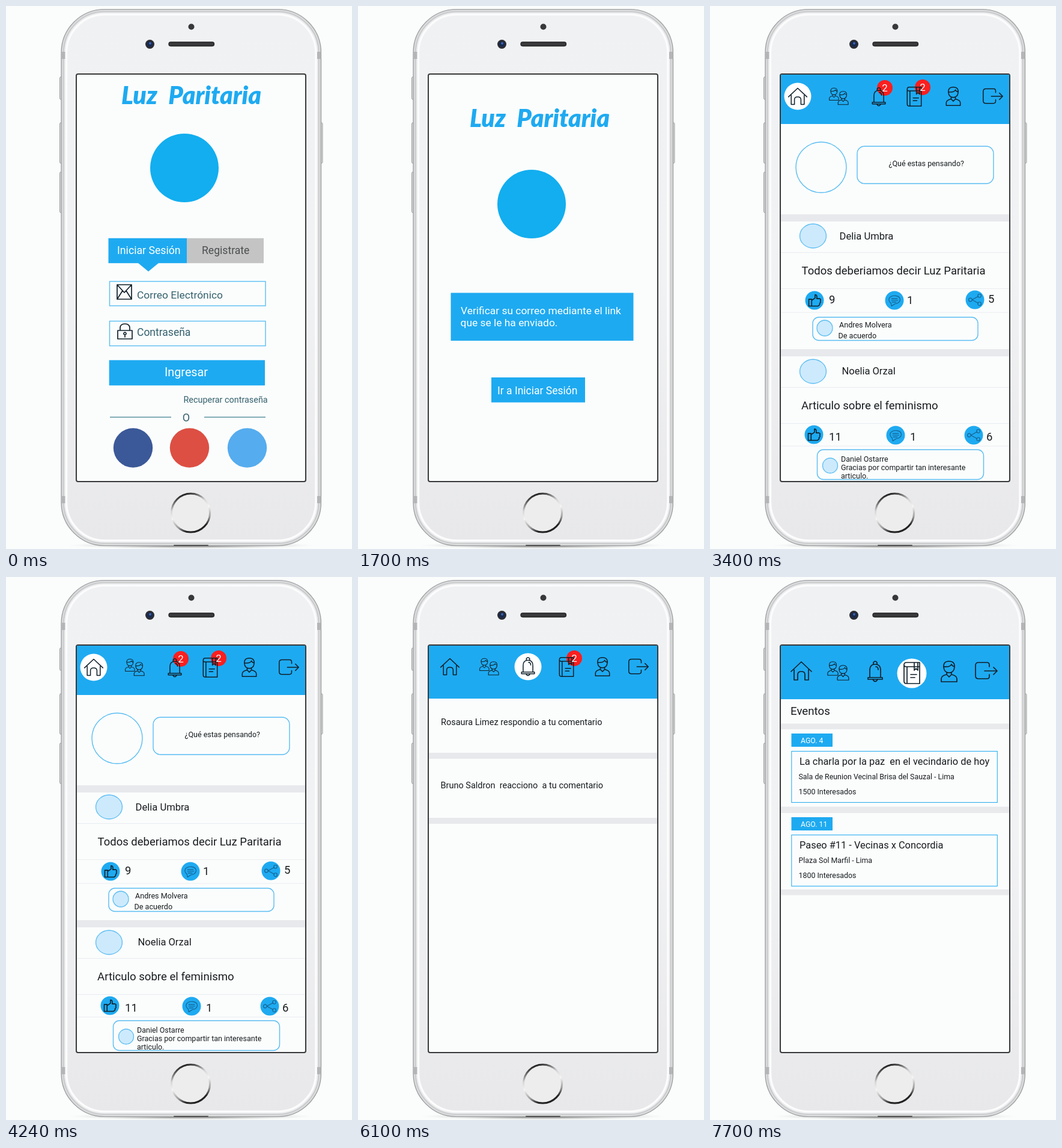
An HTML page that plays this animation: 576 px wide and 902 px high, repeating every 8000 ms.

```html
<!DOCTYPE html>
<html lang="es">
<head>
<meta charset="utf-8">
<style>
  html, body { margin: 0; width: 100%; height: 100%; overflow: hidden; background: #fafdfc; }
  svg { display: block; width: 576px; height: 902px; }
  text { font-family: Roboto, "Liberation Sans", sans-serif; white-space: pre; }
  .title { font: italic 900 41px Lato, "Open Sans", sans-serif; word-spacing: 10px; }
  .icon { fill: none; stroke: #10202a; stroke-width: 1.7; stroke-linecap: round; stroke-linejoin: round; }
</style>
</head>
<body>
<svg id="stage" viewBox="0 0 576 902">
  <defs>
    <linearGradient id="body" x2="0" y2="1">
      <stop stop-color="#f0f1f3"/><stop offset=".5" stop-color="#f1f2f3"/><stop offset="1" stop-color="#e8e8ea"/>
    </linearGradient>
    <linearGradient id="button" x2=".35" y2="1">
      <stop stop-color="#999"/><stop offset=".12" stop-color="#222"/><stop offset=".4" stop-color="#d5d5d5"/>
      <stop offset=".6" stop-color="#f5f5f5"/><stop offset=".85" stop-color="#999"/><stop offset="1" stop-color="#222"/>
    </linearGradient>
    <radialGradient id="shade">
      <stop stop-color="#555"/><stop offset=".3" stop-color="#999"/><stop offset="1" stop-color="#ddd" stop-opacity="0"/>
    </radialGradient>
  </defs>
  <g id="phone"></g>
  <g id="screens"></g>
</svg>
<script>
const BLUE = '#1eaaf1', SKY = '#5bbdf2', TEAL = '#35616d', INK = '#181c1e', PALE = '#fbfdfd';
const APP = 'Luz Paritaria';

const rect = (x, y, w, h, fill, extra = '') =>
  `<rect x="${x}" y="${y}" width="${w}" height="${h}" fill="${fill}" ${extra}/>`;
const frame = (x, y, w, h, stroke = SKY, r = 0, width = 1.4) =>
  rect(x, y, w, h, PALE, `stroke="${stroke}" stroke-width="${width}" rx="${r}"`);
const disc = (x, y, r, fill, extra = '') => `<circle cx="${x}" cy="${y}" r="${r}" fill="${fill}" ${extra}/>`;
const path = (d, fill = 'none', extra = '') => `<path d="${d}" fill="${fill}" ${extra}/>`;
const line = (x1, y1, x2, y2, stroke, width = 1) =>
  path(`M${x1} ${y1}L${x2} ${y2}`, 'none', `stroke="${stroke}" stroke-width="${width}"`);
const text = (x, y, size, str, fill = INK, extra = '') =>
  `<text x="${x}" y="${y}" font-size="${size}" fill="${fill}" ${extra}>${str}</text>`;
const centered = (x, y, size, str, fill) => text(x, y, size, str, fill, 'text-anchor="middle"');

const icons = {
  home: 'M-17 1L0-15L17 1M-12-2V15H-6V6Q-6 1 0 1Q6 1 6 6V15H12V-2',
  bell: 'M-9 10V-2Q-9-12 0-12Q9-12 9-2V10M-12 10H12V13H-12ZM-3-12V-15Q0-19 3-15V-12M-4 13Q0 20 4 13M5-3Q5-8 1-8',
  book: 'M-13-14Q-13-18-9-18H13V17H-9Q-13 17-13 13V-14Q-13-11-9-11H13M-8-11V17M4-17V-5L7-8L10-5V-17M-2 2H8M-2 7H5',
  person: 'M-9-7Q-10-17 0-17Q10-17 9-7Q8 2 0 2Q-8 2-9-7ZM-9-8Q2-7 4-12Q5-9 9-8'
    + 'M-4 1V5Q-13 7-13 12V17H13V12Q13 7 4 5V1M-4 5L0 9L4 5',
  exit: 'M5-7V-10Q5-14 1-14H-13Q-18-14-18-9V8Q-18 13-13 13H1Q5 13 5 9V6M-3 0H18M12-6L18 0L12 6',
  mail: 'M-12-12H12V12H-12ZM-12-12L0 1L12-12M-12 12L-3-2M12 12L3-2',
  lock: 'M-12-2H12V12H-12ZM-8-2V-6Q-8-13 0-13Q8-13 8-6V-2M0 9V5M-2 4Q-2 1 0 1Q2 1 2 4Q0 6-2 4',
  check: 'M5-8A10 10 0 1 0 9 0M2-6A7 7 0 1 0 6 1M-5-2L-1 4L10-8L7-10L-1-1L-3-4Z',
  thumb: 'M-10-2H-5V10H-10ZM-5 0L1-4V-10Q5-10 4-3H9Q12-2 10 1Q12 3 9 5Q10 8 6 10H-5',
  comment: 'M-6 5Q-11 1-9-4Q-5-9 2-8Q10-7 10-1Q9 5 1 6L-5 10ZM-5-3H5M-5 0H6M-4 3H3',
  share: 'M-5 0L6-6M-5 0L6 6M-5 0A3 3 0 1 1-11 0A3 3 0 1 1-5 0M11-7A3 3 0 1 1 5-7A3 3 0 1 1 11-7M11 7A3 3 0 1 1 5 7A3 3 0 1 1 11 7',
};

const icon = (name, x, y, s = 1, extra = '') => name === 'friends'
  ? icon('person', x - 8.5 * s, y - 4 * s, s * .66, extra) + icon('person', x + 8.5 * s, y + 3 * s, s * .72, extra)
  : `<path class="icon" d="${icons[name]}" transform="translate(${x} ${y}) scale(${s})" ${extra}/>`;

const tabNames = ['home', 'friends', 'bell', 'book', 'person', 'exit'];
function header(bottom, scale, active, radius, spots, badges = []) {
  const [ax, ay] = spots[active];
  return rect(118, 114, 380, bottom - 114, BLUE)
    + disc(ax, ay, radius, '#fff')
    + badges.map(([x, y]) => disc(x, y, 13, '#fb1f1f')).join('')
    + tabNames.map((name, i) => icon(name, ...spots[i], scale)).join('')
    + badges.map(([x, y]) => centered(x, y + 6, 17, '2', '#fff')).join('');
}

// Wordmark plus a plain disc where the emblem stands.
const brand = (x, y, cx, cy) =>
  `<text class="title" x="${x}" y="${y}" fill="${BLUE}">${APP}</text>` + disc(cx, cy, 57, '#12aeef');

const avatar = (x, y, rx, ry = rx) =>
  `<ellipse cx="${x}" cy="${y}" rx="${rx}" ry="${ry}" fill="#cdeafd" stroke="${SKY}" stroke-width="1.3"/>`;

const counter = (name, x, y, value, tx, ty, faint) =>
  disc(x, y, 15.5, BLUE) + icon(name, x, y, .95, faint ? 'style="stroke:#17608c;stroke-width:1.2"' : '')
  + text(tx, ty, 18.5, value);

const bars = (color, ...spans) => spans.map(([y, h]) => rect(118, y, 380, h, color)).join('');

const login = () => brand(192, 163, 297, 269)
  + rect(170.5, 385.7, 130.5, 41.5, BLUE) + rect(301, 385.7, 128, 41.5, '#c4c4c4')
  + path('M220 427H254L237 441Z', BLUE)
  + text(185, 412, 17.7, 'Iniciar Sesión', '#fff') + text(326, 412, 17.6, 'Registrate', '#4c4f50')
  + frame(172.5, 457.5, 259.5, 40.5) + icon('mail', 197, 475)
  + text(218, 485.5, 17.4, 'Correo Electrónico', TEAL)
  + frame(172.5, 523.5, 259.5, 41) + icon('lock', 198, 541)
  + text(218, 548, 17.5, 'Contraseña', TEAL)
  + rect(171.7, 588.3, 259.3, 42, BLUE) + centered(300, 614.5, 19.8, 'Ingresar', '#fff')
  + text(295.5, 659, 14.4, 'Recuperar contraseña', TEAL)
  + line(173, 683, 275, 683, '#5b93a0', 1.6) + line(330, 683, 432, 683, '#5b93a0', 1.6)
  + centered(300, 690, 18, 'O', TEAL)
  + disc(211.5, 734, 32.7, '#3b5998') + disc(305.5, 734, 32.7, '#dd4f43') + disc(401.5, 734, 32.7, '#55acee');

const fields = [
  [193, 444.5, 'person', 223, 466, 246, 472.5, 'Nombre', .66],
  [194, 506.5, 'mail', 222, 531, 246, 534.5, 'Correo Electrónico', .82],
  [195, 567.5, 'lock', 223, 593, 248, 602.5, 'Contraseña', .82],
  [195, 630.5, 'check', 221.5, 653, 246, 658.5, 'Validar contraseña', 1],
];
const register = () => brand(190, 167, 299, 269)
  + rect(193, 377.5, 119, 41.5, '#c4c4c4') + rect(311.5, 377.5, 116.5, 41.5, '#03a1ee')
  + path('M348 419H389L368.5 435Z', '#03a1ee')
  + text(202.5, 407, 17.6, 'Inicia Sesión', '#4c4f50') + text(328, 405, 17.6, 'Registrate', '#fff')
  + fields.map(([x, y, name, ix, iy, tx, ty, label, s]) =>
      frame(x, y, 235.5, 41, '#2eaff0', 0, 1.1)
      + icon(name, ix, iy, s, 'style="stroke-width:1.4"') + text(tx, ty, 17.4, label, TEAL)).join('')
  + frame(194, 687.5, 14, 14, '#555', 0, 1)
  + text(223, 697, 11.1, 'Acepto Términos de uso  y', INK, 'font-weight="500"')
  + text(222.5, 710, 11.1, 'Política de privacidad', INK, 'font-weight="500"')
  + rect(194, 730, 237, 41.5, '#03a1ee') + centered(310, 758.5, 19.6, 'Registrarme', '#fff');

const verify = () => brand(186, 201, 289, 329)
  + rect(154.5, 476.5, 304, 79.5, BLUE)
  + text(171, 512, 17.4, 'Verificar su correo mediante el link', '#fff')
  + text(170.5, 532, 17.4, 'que se le ha enviado.', '#fff')
  + rect(222, 617, 156, 41.5, BLUE) + text(232, 644.5, 17.5, 'Ir a Iniciar Sesión', '#fff');

const feed = () => header(196, .9, 0, 22.5,
    [[146, 150], [214, 150], [281, 151], [340, 151], [405, 150], [471, 150]], [[291, 136], [354, 135]])
  + disc(185, 268, 42, PALE, `stroke="${SKY}" stroke-width="1.4"`)
  + frame(245, 233, 227, 62, SKY, 12) + text(297.5, 265.5, 12.5, '¿Qué estas pensando?')
  + bars('#e8e9ec', [346, 12], [570, 12])
  + bars('#e9ecef', ...[409, 469, 508.5, 633, 693, 730.5].map(y => [y, 1]))
  + avatar(171.5, 382, 22, 20) + text(215.5, 388, 16.6, 'Delia Umbra')
  + text(152.5, 446, 18.5, `Todos deberiamos decir ${APP}`)
  + counter('thumb', 174, 489, 9, 198, 494) + counter('comment', 307, 489, 1, 328, 495, true)
  + counter('share', 441, 488, 5, 463, 493, true)
  + frame(171, 517, 275, 38.5, SKY, 10) + avatar(191, 535, 13)
  + text(215, 533.5, 12.6, 'Andres Molvera') + text(213.5, 552, 12.6, 'De acuerdo')
  + avatar(171.5, 607, 22, 20) + text(219.5, 612, 16.5, 'Noelia Orzal')
  + text(152, 669.5, 18.6, 'Articulo sobre el feminismo')
  + counter('thumb', 173, 712, 11, 198, 722) + counter('comment', 309, 713, 1, 333, 722, true)
  + counter('share', 439, 713, 6, 460, 722, true)
  + frame(178.5, 737, 277, 49.5, SKY, 10) + avatar(200, 763.5, 12.5)
  + text(218, 757, 12.5, 'Daniel Ostarre') + text(218, 771, 12.5, 'Gracias por compartir tan interesante')
  + text(218, 785, 12.5, 'articulo.');

const friends = () => header(201, 1, 1, 24.5,
    [[152, 154], [214, 153], [274, 154], [336, 153], [397, 154], [465, 154]], [[283, 136], [354, 136]])
  + bars('#edeff2', [201, 10], [291, 1])
  + line(239.5, 211, 239.5, 291, '#e8ecf0') + line(370.5, 211, 370.5, 291, '#e8ecf0')
  + text(140, 255.5, 18.9, 'Buscar') + text(262.5, 255.5, 18.9, 'Solicitudes') + text(406, 255.5, 18.9, 'Amigos');

const alerts = () => header(202, .9, 2, 22.5,
    [[153, 149], [218, 149], [283, 149], [347, 150], [407, 149], [467, 149]], [[360, 135]])
  + bars('#e8e9ec', [292, 10], [400, 10])
  + text(138, 246, 14.5, 'Rosaura Limez respondio a tu comentario')
  + text(137.5, 351, 14.5, 'Bruno Saldron  reacciono  a tu comentario');

const event = (y, day, name, place, count) =>
  rect(135.5, y, 68.5, 22, BLUE) + text(151, y + 15.5, 12.3, day, '#fff')
  + frame(135.8, y + 29.5, 342.5, 85, '#2eaff0', 0, 1.1)
  + text(149, y + 52, 16.4, name) + text(147.5, y + 75.5, 12.4, place) + text(147.5, y + 101, 12.4, count);

const events = () => header(203, 1, 3, 24.5,
    [[152, 156], [213, 156], [275, 157], [336, 160], [398, 157], [460, 156]])
  + text(134, 229, 18.7, 'Eventos')
  + bars('#e8eaec', [243.5, 9.5], [381.5, 10.5], [519, 9.5])
  + event(260, 'AGO. 4', 'La charla por la paz  en el vecindario de hoy',
      'Sala de Reunion Vecinal Brisa del Sauzal - Lima', '1500 Interesados')
  + event(399, 'AGO. 11', 'Paseo #11 - Vecinas x Concordia', 'Plaza Sol Marfil - Lima', '1800 Interesados');

function phone() {
  const side = (x, y, h) => rect(x, y, 4, h, '#ddd', 'rx="1.5" stroke="#999" stroke-width="1"');
  const shell = (inset, r, fill, stroke, width) => rect(92 + inset, 5.5 + inset, 432.5 - 2 * inset, 891 - 2 * inset,
    fill, `rx="${r}" stroke="${stroke}" stroke-width="${width}"`);
  return '<ellipse cx="308" cy="896" rx="205" ry="6" fill="url(#shade)"/>'
    + side(89.5, 118, 37) + side(89.5, 194, 67) + side(89.5, 276, 67) + side(523, 194, 67)
    + shell(0, 72, '#d9dadb', '#969798', 1.2)
    + shell(4, 68, '#e9eaeb', '#c6c7c8', 1.5)
    + [[92, 76], [518, 76], [92, 814], [518, 814]].map(([x, y]) => rect(x, y, 6.5, 12, '#b4b5b6')).join('')
    + shell(8.5, 64, 'url(#body)', '#fcfcfd', 3.5)
    + rect(279, 895, 58, 2, '#555', 'rx="1"')
    + disc(308.5, 34.5, 5, '#38383a')
    + rect(271, 60, 75.5, 6.5, '#3a3a3c', 'rx="3.2" stroke="#222" stroke-width="1.3"')
    + disc(239.5, 63.5, 7.5, '#2b2d35') + disc(239.5, 63.5, 4.4, '#17284f') + disc(240, 62, 2, '#3c64ae')
    + disc(307.5, 842, 32, '#ededee', 'stroke="url(#button)" stroke-width="3"')
    + rect(117, 113, 382, 677, PALE, 'rx="3" stroke="#38393a" stroke-width="2"');
}

const LOOP = 8000;
const timeline = [[0, login], [500, register], [1700, verify], [3400, feed], [4800, friends], [6100, alerts], [7700, events]];

document.getElementById('phone').innerHTML = phone();
const holder = document.getElementById('screens');
holder.innerHTML = timeline.map(([, draw]) => `<g display="none">${draw()}</g>`).join('');
const screens = [...holder.children];

function render(ms) {
  const t = ms % LOOP;
  const current = timeline.filter(([start]) => start <= t).length - 1;
  screens.forEach((g, i) => g.setAttribute('display', i === current ? 'inline' : 'none'));
}

const begin = performance.now();
function tick() {
  render(performance.now() - begin);
  requestAnimationFrame(tick);
}
render(0);
requestAnimationFrame(tick);
</script>
</body>
</html>
```
